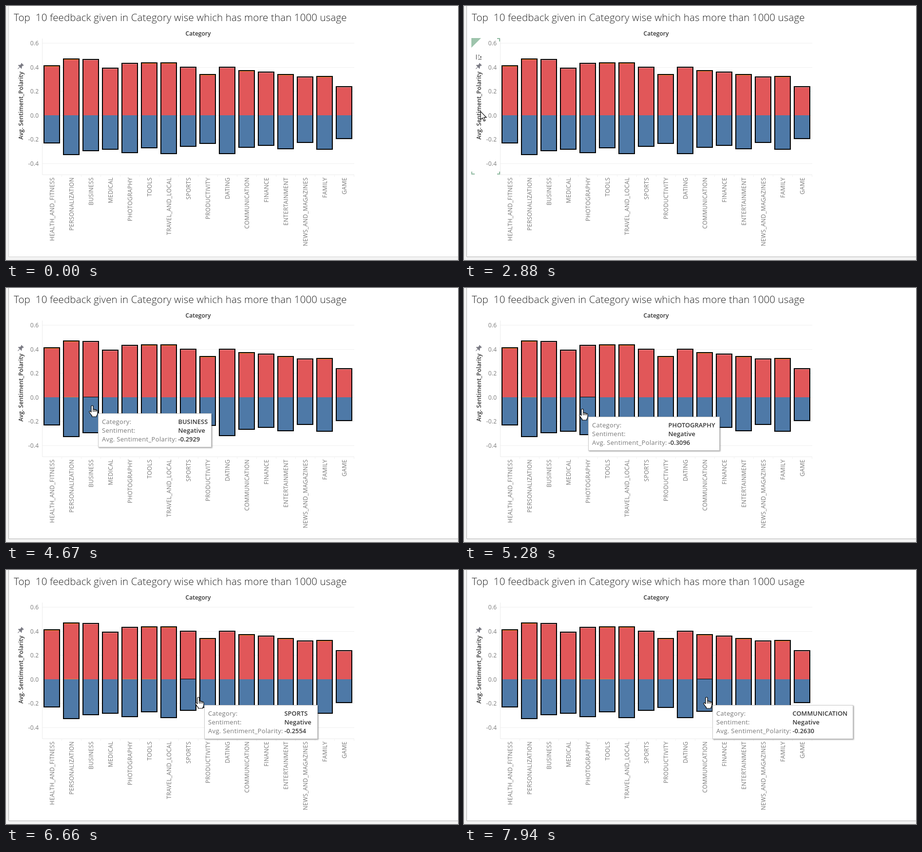
Animation, 928 px wide and 523 px high, one loop 8 s. Source, as an HTML page:

```html
<!DOCTYPE html>
<html lang="en">
<head>
<meta charset="utf-8">
<title>Feedback by category</title>
<style>
html, body { margin: 0; width: 100%; height: 100%; overflow: hidden; background: #fff; }
svg { display: block; width: 928px; height: 523px; font-family: "Open Sans", "Noto Sans", sans-serif; }
text { white-space: pre; }
.title { font-size: 20.5px; font-weight: 300; letter-spacing: .13px; fill: #222; }
.head { font-size: 12px; font-weight: 600; fill: #333; }
.tick { font-size: 12px; letter-spacing: .3px; fill: #7b7b7b; text-anchor: end; }
.name { font-size: 12px; letter-spacing: .27px; fill: #787878; text-anchor: end; }
.label { font-size: 13px; letter-spacing: .32px; fill: #787878; }
.value { font-size: 12.8px; font-weight: 600; letter-spacing: .08px; fill: #333; }
</style>
</head>
<body>
<svg id="stage" viewBox="0 0 928 523">
  <defs>
    <pattern id="hatch" width="2" height="4" patternUnits="userSpaceOnUse">
      <rect width="2" height="4" fill="#b5d3c0"/><rect width="1" height="4" fill="#86b598"/>
    </pattern>
    <filter id="shade" x="-5%" y="-10%" width="110%" height="130%">
      <feDropShadow dx="1.5" dy="1.5" stdDeviation="1.2" flood-color="#000" flood-opacity=".35"/>
    </filter>
  </defs>
  <rect width="928" height="523" fill="#f3f3f3"/>
  <rect x="5" y="-2" width="930" height="519" fill="#fff"/>
  <path id="border" d="M5.5 0V516.5H928" fill="none"/>
  <text class="title" x="16" y="31">Top  10 feedback given in Category wise which has more than 1000 usage</text>
  <text class="head" x="394.5" y="61" text-anchor="middle">Category</text>
  <text class="head" transform="translate(35 275) rotate(-90)" letter-spacing=".12">Avg. Sentiment_Polarity</text>
  <g transform="translate(30 124) rotate(45)" fill="#7b7b84">
    <path d="M-3.5-6H3.5V-4.5H2.5V-1L4.8 1V2.5H-4.8V1L-2.5-1V-4.5H-3.5Z"/>
    <path d="M-.6 2H.6V8H-.6Z"/>
  </g>
  <g id="chart"></g>
  <g id="axis">
    <path d="M15 66H35L15 86Z" fill="url(#hatch)"/>
    <path d="M68 67H73V73M16 341V346H22M68 346H73V341" fill="none" stroke="#8fb9a0" stroke-width="2"/>
    <path d="M25.5 100V110M29 101.5H32M29 105H30.5M29 109.5H36M33 105H36M34.5 103V107" fill="none" stroke="#666" stroke-width="1.4"/>
  </g>
  <path id="mark" fill="none" stroke="#000"/>
  <g id="tip">
    <rect id="box" height="69" fill="#fff" stroke="#c8c8c8" filter="url(#shade)" x=".5" y=".5"/>
    <text class="label" x="8" y="22">Category:</text>
    <text class="label" x="8" y="40">Sentiment:</text>
    <text class="label" x="8" y="58">Avg. Sentiment_Polarity:</text>
    <text class="value" x="164.5" y="22" id="v0"></text>
    <text class="value" x="164.5" y="40" id="v1"></text>
    <text class="value" x="164.5" y="58" id="v2"></text>
  </g>
  <g id="arrow">
    <path d="M0 0V17L4 13.5L7 20L9.7 19L6.8 12.4H12Z" fill="#fff" stroke="#000" stroke-width="1.1"/>
  </g>
  <g id="hand" stroke="#000" stroke-width="1.2" stroke-linejoin="round">
    <path d="M-2 12V1Q-2-1 0-1T2 1V7Q3.5 6 5 7.5Q7 7 8 8.5Q10.5 8 11 10.5V15Q11 18 9 20V22H-.5V20Q-4 16-6 12.5Q-6.5 10.5-4.5 10.5Q-3 11-2 12.5Z" fill="#fff"/>
    <path d="M2 7V12M5 8V12M8 9V12" fill="none"/>
  </g>
</svg>
<script>
const LOOP = 8000, ZERO = 225, UNIT = 247.5, LEFT = 77, STEP = 40;
const $ = id => document.getElementById(id);

// name, top edge of the bar, size of the negative mean, tooltip width
const bars = [
  ["HEALTH_AND_FITNESS", 122, .2283, 320], ["PERSONALIZATION", 108, .3253, 320],
  ["BUSINESS", 109, .2929, 233], ["MEDICAL", 127, .2808, 233],
  ["PHOTOGRAPHY", 117, .3096, 270], ["TOOLS", 116, .2687, 233],
  ["TRAVEL_AND_LOCAL", 116, .3172, 308], ["SPORTS", 125, .2554, 233],
  ["PRODUCTIVITY", 140, .2323, 280], ["DATING", 125, .3162, 233],
  ["COMMUNICATION", 132, .2630, 289], ["FINANCE", 135, .2485, 233],
  ["ENTERTAINMENT", 140, .2768, 280], ["NEWS_AND_MAGAZINES", 145, .2242, 320],
  ["FAMILY", 144, .2808, 233], ["GAME", 165, .1919, 233]
];
const neutral = [0, 1, 5, 6, 8, 10, 12, 14];

// pointer path: time, x, y
const path = [
  [0, 150, -26], [70, 150, -20], [230, 146, 3], [400, 140, -24], [1050, 132, -24],
  [1120, 130, -19], [1870, 115, 4], [2300, 70, 95], [2680, 36, 198], [2880, 34, 217],
  [3200, 50, 213], [3570, 108, 207], [4130, 134, 197], [4400, 152, 237],
  [4470, 156.5, 240], [5210, 231, 250], [5280, 243, 250], [6040, 342, 260],
  [6660, 395, 263], [6860, 413, 267], [7150, 436, 267], [7670, 483, 266],
  [7940, 498, 263], [LOOP, 498, 263]
];

function add(tag, attrs, label) {
  const el = document.createElementNS("http://www.w3.org/2000/svg", tag);
  for (const key in attrs) el.setAttribute(key, attrs[key]);
  if (label) el.textContent = label;
  $("chart").append(el);
  return el;
}
const rect = (x, y, width, height, fill) => add("rect", { x, y, width, height, fill });

function drawChart() {
  for (let i = -2; i <= 3; i++) {
    const y = ZERO - i * .2 * UNIT;
    add("path", { d: `M75 ${Math.floor(y) + .5}H715`, stroke: "#f0f0f0" });
    add("text", { class: "tick", x: 67.5, y: y + 4.8 }, (i * .2).toFixed(1));
  }
  add("path", { d: "M74.5 67V347.5H715", stroke: "#ececec", fill: "none" });
  bars.forEach(([name, top, neg], i) => {
    const x = LEFT + i * STEP, bottom = Math.round(ZERO + neg * UNIT + 1.5);
    rect(x + 1, top + 1, 32, ZERO - top - 1, "#e15759");
    rect(x + 1, ZERO, 32, bottom - ZERO - 1, "#4e79a7");
    rect(x + 2, top + 2, 30, 1, neutral.includes(i) ? "#f28e2b" : "#e39a9b");
    add("rect", { x: x + 1, y: top + 1, width: 32, height: bottom - top - 2,
      fill: "none", stroke: "#000", "stroke-width": 2 });
    add("path", { d: `M${x + 37.5} 348V352`, stroke: "#f2f2f2" });
    add("text", { class: "name", transform: `translate(${x + 21.5} 353) rotate(-90)` }, name);
  });
}

// thin neutral line left along zero once a bar has been visited
function trace(i, from) {
  const el = rect(LEFT + i * STEP + 2, ZERO - 1, 30, 1, "#f28e2b");
  el.setAttribute("opacity", .6);
  return { el, from };
}

function pointer(t) {
  const k = path.findIndex(p => p[0] > t);
  const [t0, x0, y0] = path[k - 1], [t1, x1, y1] = path[k];
  const f = (t - t0) / (t1 - t0);
  return [x0 + (x1 - x0) * f, y0 + (y1 - y0) * f];
}

const show = (el, on) => el.setAttribute("visibility", on ? "visible" : "hidden");
const place = (el, x, y) => el.setAttribute("transform", `translate(${Math.round(x)} ${Math.round(y)})`);

function render(t) {
  const [x, y] = pointer(t);
  const over = t > 2880 && x >= LEFT;
  $("border").setAttribute("stroke", y > -2 ? "#b2b2b2" : "#d2d2d2");
  show($("axis"), x < 75 && y > 66);
  show($("arrow"), !over);
  show($("hand"), over);
  show($("tip"), over);
  show($("mark"), over);
  place($(over ? "hand" : "arrow"), x, y);
  traces.forEach(({ el, from }) => show(el, t >= from));
  if (!over) return;

  const i = Math.floor((x - LEFT) / STEP), [name, top, neg, width] = bars[i];
  const positive = y < ZERO;
  $("mark").setAttribute("d", `M${LEFT + i * STEP} ${positive ? 225.5 : 224.5}h34`);
  $("box").setAttribute("width", width - 1);
  $("v0").textContent = name;
  $("v1").textContent = positive ? "Positive" : "Negative";
  $("v2").textContent = positive ? ((223.19 - top) / UNIT).toFixed(4) : "-" + neg.toFixed(4);
  place($("tip"), x + 12, y + 15);
}

drawChart();
const traces = [trace(1, 4480), trace(4, 5600), trace(5, 5900)];
const start = performance.now();
function frame() {
  render((performance.now() - start) % LOOP);
  requestAnimationFrame(frame);
}
frame();
</script>
</body>
</html>
```
